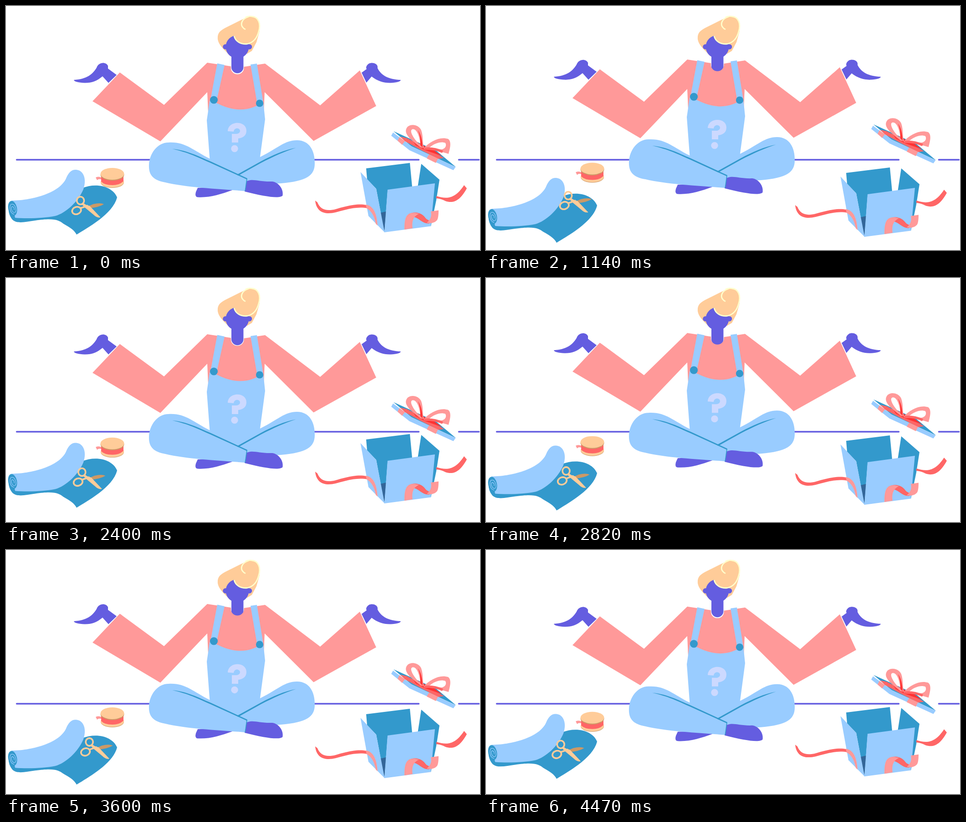
Recreate the animation shown at these times as an HTML page. Size 1041 px wide and 538 px high, loop 4.5 s.

```html
<!DOCTYPE html>
<html lang="en">
<head>
<meta charset="utf-8">
<title>Unboxing puzzle</title>
<style>
  html, body { margin: 0; width: 100%; height: 100%; overflow: hidden; background: #fff; }
  svg { display: block; width: 1041px; height: 538px; }
  .violet { fill: #645de0; }
  .sky { fill: #9cf; }
  .blue { fill: #39c; }
  .navy { fill: #369; }
  .pink { fill: #f99; }
  .red { fill: #f66; }
  .scarlet { fill: #f33; }
  .peach { fill: #fc9; }
  .tan { fill: #c96; }
  .line { fill: none; }
</style>
</head>
<body>
<svg viewBox="0 0 1041 538">
  <path class="line" d="M23.5 339H906.500M994.500 339H1038.500" stroke="#645de0" stroke-width="3.600" stroke-linecap="round"/>

  <g id="head">
    <path class="peach" d="M465 73C464 59 470 55 482 48L522 28L557 55L550 80L540 99L530 105L492 110C484 100 467 88 465 73Z"/>
    <circle class="violet" cx="508" cy="90" r="25.500"/>
    <circle class="violet" cx="482" cy="90" r="5.800"/>
    <circle class="violet" cx="534.500" cy="90" r="5.800"/>
    <path class="violet" d="M495 100H521.500V135A13.200 13.200 0 0 1 495 135Z"/>
    <path class="peach" d="M501 65C504 79 517 85 530 83C546 80 552 68 555 56C560 40 555 24 540 23C528 22 518 29 516 40Z"/>
    <g class="line" stroke="#ffc" stroke-width="2.800">
      <path d="M501 66C504 79 517 85 530 83.500C546 80 552 68 555 56C560 40 555 24 540 23C535 22 530 23 526 25"/>
      <path d="M533 23.500C518 28 514 40 520 47Q522 50 526 51.500"/>
    </g>
  </g>

  <g id="body">
    <path class="violet" d="M149 163C177 161 189 152 199 136C203 124 219 122 224 132L224 138L243 152L225 169.500L212 155C199 166 187 170 172 169.500C160 169 150 167 149 163Z"/>
    <path class="violet" d="M867 163C840 162 824 153 816 137C818 127 805 123 797 127C791 131 790 136 792 139L781 147L791.500 169L803 155.500C817 166 830 170 845 169.500C857 169 866 167 867 163Z"/>
    <path class="pink" d="M442 125L494 133V137A14.200 13.500 0 0 0 522.500 137V134L569 127L690 219L777 142L813 220.500L675.500 297.500L568 190L566 235H444L442 190L339 298.500L190 210L250 146.500L347 218Z"/>
    <path class="violet" d="M421 401L417 410Q414 421 421 421.500C447 423 472 415 497 406V398Z"/>
    <path class="sky" d="M447 211L449 206Q515 248 565 211L569 250L558 333C598 313 612 296 639 296C667 296 678 320 678 345C679 373 662 386 604 391L525 395L508 374L448 345L441 252Z"/>
    <path class="sky" d="M314 350C315 326 332 301 357 301C394 299 410 318 448 337L529 381L524.500 408C480 404 399 401 350 389C323 384 313 373 314 350Z"/>
    <path class="violet" d="M529 386C544 380 555 388 585 387C599 389 610 404 607.500 418C602 425 570 421 524 409Z"/>
    <path class="blue" d="M365 315C401 319 421 331 449 342.500L530 380L526 408H524.500L528 382L448 345.500C420 333 400 323 365 315Z"/>
    <path class="blue" d="M507 372L559 343C587 328 610 318 637 312.500C611 321 589 331 560 346L510 374Z"/>
    <path class="sky" d="M464 126.500L480 130L463 207H449Z"/>
    <path class="sky" d="M537 129L551 127L565 213L551 211Z"/>
    <circle class="blue" cx="456.500" cy="207" r="8.600"/>
    <circle class="blue" cx="557" cy="214.500" r="8.100"/>
    <g fill="#ccd9ff">
      <path d="M487 276C488 252 528 252 528 275C528 286 520 291 510 292V301H496V282H505C511 282 514 279 514 275.500C514 268 501 267 500 277Z"/>
      <circle cx="502" cy="314.500" r="7.700"/>
    </g>
  </g>

  <g id="cloth">
    <path class="blue" d="M6 436Q3 458 14 471C24 481 43 476 64 473C105 467 116 472 126 480C140 488 150 494 155 504C177 490 235 459 244 422C235 399 200 388 166 402L60 440Z"/>
    <path class="sky" d="M12 429C53 429 117 414 132 380C137 368 143 360.500 154 361C170 362 178 381 170 404C159 431 131 457 108 463C83 468 47 469 20 467Z"/>
    <ellipse class="blue" cx="14.500" cy="446" rx="9.500" ry="16.500" transform="rotate(-12 14.500 446)"/>
    <path class="line" d="M18 459C8 458 6 439 12 437C20 435 25 452 20 455C13 457 9 443 14 442Q19 444 18 450" stroke="#9cf" stroke-width="1.200"/>
  </g>

  <g id="spool">
    <path class="pink" d="M197 378Q202 375 210 378V383Q204 380 200 384Z"/>
    <ellipse class="tan" cx="233.500" cy="389" rx="25.500" ry="12"/>
    <ellipse class="peach" cx="233.500" cy="388" rx="25.500" ry="12"/>
    <path class="red" d="M209 374H258V386Q250 395 234 395Q216 395 209 387Z"/>
    <ellipse class="tan" cx="233.500" cy="372" rx="26" ry="13"/>
    <ellipse class="peach" cx="233.500" cy="370" rx="26" ry="13"/>
  </g>

  <g id="scissors">
    <path class="tan" d="M177 443L191 437Q207 433 215 437Q204 444 181 446Z"/>
    <g class="line" stroke="#fc9" stroke-width="3.600">
      <ellipse cx="163.500" cy="429" rx="8" ry="8.500"/>
      <ellipse cx="155" cy="451" rx="10" ry="8" transform="rotate(-20 155 451)"/>
      <path d="M163 446L180 440"/>
    </g>
    <path class="peach" d="M166 437L170 434.500L175 438L184 441L207.500 466Q200 468 192 460L174 445Z"/>
  </g>

  <g id="box">
    <path class="blue" d="M791 358L887 346L892 399L838 410L831 499L813 403L793 382Z"/>
    <path class="blue" d="M912 348L952 383L945 428L933 486L904 400Z"/>
    <path class="navy" d="M822 456L835 453L831 499Z"/>
    <path class="sky" d="M778.500 366L813 403L831.500 499L796 463Z"/>
    <path class="sky" d="M838 405L942 391L933 485.500L831 499Z"/>
    <path class="red" d="M679 429L684 433C690 449 704 453 724 448C757 438 785 433 801 443L794 446C771 441 747 449 724 455C703 460 682 457 679 429Z"/>
    <path class="pink" d="M790 438C808 440 815 461 816 484L812 480C809 463 802 451 792 446Z"/>
    <path class="red" d="M945 419C970 427 987 424 1006 395L1012 402C997 430 982 436 965 430Q956 425 945 424Z"/>
    <path class="red" d="M884 459C899 451 914 457 921 467C925 473 931 470 931 479C917 483 906 466 895 465Z"/>
    <path class="pink" d="M875 493C875 468 878 455 898 456L907 458C894 464 891 475 893 490Z"/>
    <path class="pink" d="M933 453L950 450.500Q950 469 946 473Q938 481 924 478C934 470 935 461 933 453Z"/>
  </g>

  <g id="lid">
    <path class="blue" d="M851 276L945 319L988 355L890 309Z"/>
    <path class="sky" d="M850 279L892 310L987.500 355L982.500 362L886 318L846 286Z"/>
    <path class="pink" d="M864 289L876 298L870 306L860 297Z"/>
    <path class="pink" d="M929 327L949 336L944 346L924 336Z"/>
    <path class="red" d="M866 288L880 291L914 309L962 335L950 337L912 318L876 298Z"/>
    <path class="scarlet" d="M891 294L913 306L940 318L958 331L921 318L900 307Z"/>
    <path class="pink" fill-rule="evenodd" d="M911 312C893 298 874 284 879 271C884 258 906 260 912 274C917 289 914 301 918 313ZM905 302C893 289 886 275 892 272C901 269 908 285 910 305Z"/>
    <path class="scarlet" d="M905 274Q914 287 915 312L910 307Q911 289 905 274Z"/>
    <path class="pink" fill-rule="evenodd" d="M917 314C931 299 952 287 971 293C980 300 974 317 972 326L958 322Q944 316 923 317ZM930 312C942 302 956 298 965 302C968 308 965 314 958 316C949 317 940 314 930 312Z"/>
    <path class="red" d="M920 312Q939 310 960 319L958 324Q941 316 918 317Z"/>
  </g>
</svg>
<script>
  const LOOP = 4500;
  // Offsets [x, y] at each quarter of the loop, joined linearly.
  const still = [0, 0];
  const tracks = {
    body: [still, [0, -7], still, [0, -7.6], still],
    lid: [still, [0, -15.2], still, [0, -16.3], still],
    cloth: [still, [0, 18.3], [0, .3], [0, 16.7], still],
    spool: [still, [0, -11.7], [0, -4], [0, -12.6], still],
    scissors: [still, [17.3, -11.2], still, [24.5, -7.1], still],
    box: [still, [0, 10.3], [0, -3.1], [0, 5], still]
  };
  const parts = Object.entries(tracks).map(([id, keys]) => [document.getElementById(id), keys]);

  function draw(now) {
    const phase = (now % LOOP) / LOOP * 4;
    const i = Math.floor(phase), u = phase - i;
    for (const [part, keys] of parts) {
      const [x, y] = keys[i].map((a, axis) => a + (keys[i + 1][axis] - a) * u);
      part.setAttribute('transform', `translate(${x} ${y})`);
    }
    requestAnimationFrame(() => draw(performance.now()));
  }
  draw(performance.now());
</script>
</body>
</html>
```
